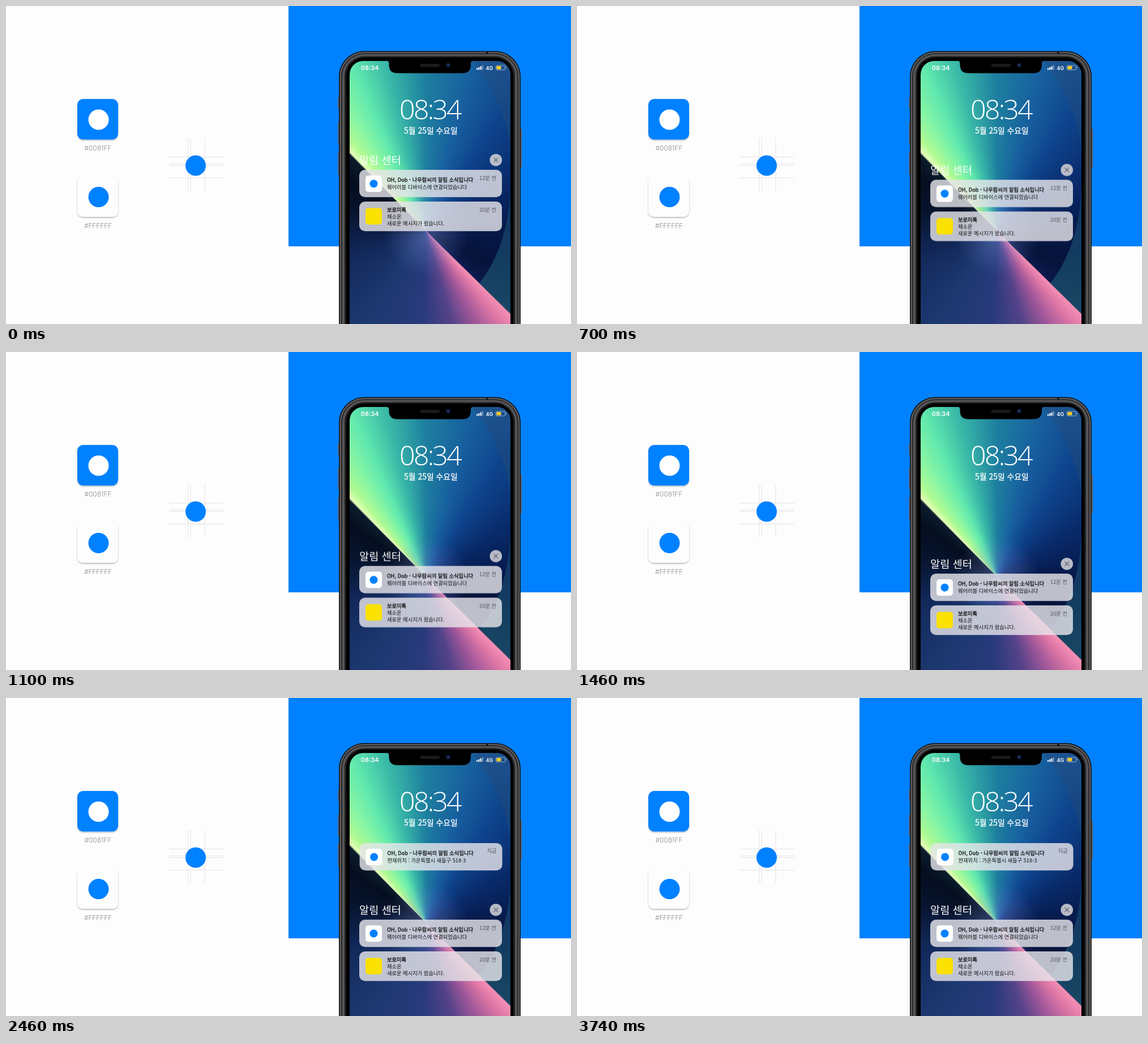
Recreate the animation shown at these times as an HTML page. Size 998 by 561 pixels, loop 3.76 s.

```html
<!DOCTYPE html>
<html lang="ko">
<head>
<meta charset="utf-8">
<title>Notification center</title>
<style>
  html, body { margin: 0; width: 100%; height: 100%; overflow: hidden; background: #fdfdfd; }
  .stage { position: relative; width: 998px; height: 561px; overflow: hidden; }
  svg { position: absolute; left: 0; top: 0; }
  text { font-family: "Noto Sans CJK KR", "Noto Sans CJK", "Noto Sans", sans-serif; }

  .wall {
    position: absolute; left: 606.5px; top: 97px; width: 284.5px; height: 470px;
    border-radius: 24px 24px 0 0;
    background:
      radial-gradient(circle at 135px 303px, rgba(110, 130, 200, .5), rgba(110, 130, 200, 0) 75px),
      conic-gradient(from 0deg at 135px 300px,
        #1d7e9f 0deg, #175f9f 16deg, #0e438c 33deg, #092a6a 58deg, #06194a 88deg,
        #06133a 118deg, #0b1a4c 134deg, #f58fb4 134.7deg, #dd76a5 141deg,
        #a2589a 151deg, #554389 164deg, #283a7c 182deg, #1c3870 215deg,
        #12285a 252deg, #07142e 285deg, #050e20 305deg, #0b1c2c 315deg,
        #e6ffba 316deg, #b2fa92 320deg, #86f5a4 328deg, #60e8ae 336deg,
        #3abaa8 346deg, #1d7e9f 360deg);
  }

  .label { font: 300 11.8px Inter, sans-serif; fill: #8b8b90; text-anchor: middle; }
  .guide { stroke: #e2e2e6; stroke-width: 1; }
  .status { font-family: Inter, sans-serif; font-weight: 600; fill: #fff; }
  .clock { font: 300 48.3px "Open Sans", sans-serif; letter-spacing: -2.8px; fill: #fff; text-anchor: middle; }
  .date { font-size: 13.9px; fill: #fff; stroke: #fff; stroke-width: .3; text-anchor: middle; }
  .head { font-size: 18.7px; fill: #fff; }
  .card { fill: #e6e5ea; fill-opacity: .82; }
  .title, .sub { font-size: 9.25px; fill: #111; }
  .title { stroke: #111; stroke-width: .28; }
  .ago { font-size: 9.3px; fill: #55555b; text-anchor: end; }

  .list { animation: drop 3760ms infinite; }
  .fresh { animation: slide 3760ms infinite; }
  @keyframes drop {
    0% { transform: translateY(-102px); }
    13.16% { transform: translateY(-102px); animation-timing-function: cubic-bezier(.33, 0, .67, 1); }
    34.04%, 100% { transform: none; }
  }
  @keyframes slide {
    0% { transform: translateX(-290px); }
    37.1% { transform: translateX(-290px); animation-timing-function: cubic-bezier(.33, 0, .67, 1); }
    58.3%, 100% { transform: none; }
  }
</style>
</head>
<body>
<div class="stage">
  <svg width="998" height="561" viewBox="0 0 998 561">
    <defs>
      <filter id="shadow" x="-20%" y="-20%" width="140%" height="140%">
        <feDropShadow dx="0" dy="1.5" stdDeviation="1.2" flood-color="#000" flood-opacity=".3"/>
      </filter>
    </defs>
    <rect width="998" height="561" fill="#fdfdfd"/>
    <rect x="499" width="499" height="424" fill="#0081ff"/>

    <!-- brand tiles -->
    <rect x="126" y="164" width="72" height="71.5" rx="10" fill="#0081ff" filter="url(#shadow)"/>
    <circle cx="163.5" cy="200.5" r="18" fill="#fff"/>
    <text class="label" x="162.5" y="255">#0081FF</text>
    <rect x="126" y="300" width="72" height="72" rx="10" fill="#fdfdfd" filter="url(#shadow)"/>
    <circle cx="163.5" cy="337" r="18" fill="#0081ff"/>
    <text class="label" x="162.5" y="391.5">#FFFFFF</text>

    <!-- construction lines -->
    <path class="guide" d="M321.5 233V327M326 233V327M351 233V327M288 266.5H384M288 278.5H384M288 281.5H384M288 303.5H384"/>
    <circle cx="335" cy="281.5" r="18" fill="#0081ff"/>

    <!-- phone body -->
    <g fill="#5c5d62">
      <rect x="586.5" y="161" width="4" height="21" rx="1.5"/>
      <rect x="586.5" y="205" width="4" height="38" rx="1.5"/>
      <rect x="586.5" y="256" width="4" height="42" rx="1.5"/>
      <rect x="906.5" y="216" width="4.5" height="69" rx="1.5"/>
    </g>
    <rect x="588" y="79.5" width="321" height="560" rx="45" fill="#151516"/>
    <rect x="589.7" y="81.2" width="317.6" height="560" rx="43.3" fill="#6a696b"/>
    <rect x="591.6" y="83" width="313.8" height="560" rx="41.4" fill="#2b2a2c"/>
    <rect x="594" y="85" width="309" height="560" rx="39" fill="#555456"/>
    <rect x="598" y="88.5" width="301" height="560" rx="35" fill="#1e1e1f"/>
    <rect x="601" y="91" width="295" height="560" rx="32" fill="#000"/>
    <rect x="848" y="80" width="4" height="5" fill="#1c1c1d"/>
  </svg>

  <div class="wall"></div>

  <svg width="998" height="561" viewBox="0 0 998 561">
    <defs>
      <clipPath id="screen"><rect x="606.5" y="97" width="284.5" height="500" rx="24"/></clipPath>
      <linearGradient id="rim" x1="0" y1="0" x2="0" y2="1">
        <stop offset="0" stop-color="#20528c"/>
        <stop offset=".5" stop-color="#123a6c"/>
        <stop offset="1" stop-color="#1d566c"/>
      </linearGradient>
      <g id="appIcon">
        <rect x="11" y="10" width="29" height="29" rx="5" fill="#fff"/>
        <circle cx="25.5" cy="24.5" r="7" fill="#0081ff"/>
      </g>
    </defs>

    <g clip-path="url(#screen)">
      <path d="M824 97Q905 200 891 320Q887 425 836 489L891 543V97Z" fill="url(#rim)" fill-opacity=".75"/>

      <text class="clock" x="749" y="200">08:34</text>
      <text class="date" x="750.5" y="224.5">5월 25일 수요일</text>

      <g class="list">
        <text class="head" x="624" y="380.5">알림 센터</text>
        <circle cx="865.3" cy="373.7" r="10.8" fill="#d0d0d6" fill-opacity=".88"/>
        <path d="M861.8 370.2l7 7m0-7l-7 7" stroke="#55555b" stroke-width="1.1" stroke-linecap="round"/>

        <g transform="translate(624 391)">
          <rect class="card" width="252" height="48.3" rx="10"/>
          <use href="#appIcon"/>
          <text class="title" x="49" y="20.6">OH, Dob - 나우람씨의 알림 소식입니다</text>
          <text class="sub" x="49" y="34.3">웨어러블 디바이스에 연결되었습니다</text>
          <text class="ago" x="242" y="17.6">12분 전</text>
        </g>

        <g transform="translate(624 447)">
          <rect class="card" width="252" height="52.3" rx="10"/>
          <rect x="11" y="11.5" width="29" height="29" rx="5" fill="#fae100"/>
          <text class="title" x="49" y="17.7">보로미톡</text>
          <text class="sub" x="49" y="30">채소온</text>
          <text class="sub" x="49" y="42.3">새로운 메시지가 왔습니다.</text>
          <text class="ago" x="242" y="17.8">20분 전</text>
        </g>
      </g>

      <g class="fresh">
        <g transform="translate(624.6 256)">
          <rect class="card" width="252" height="48.3" rx="10"/>
          <use href="#appIcon"/>
          <text class="title" x="49" y="20.6">OH, Dob - 나우람씨의 알림 소식입니다</text>
          <text class="sub" x="49" y="34.3">현재위치 : 가온특별시 새들구 518-3</text>
          <text class="ago" x="242" y="16.8">지금</text>
        </g>
      </g>
    </g>

    <!-- notch and status bar -->
    <path d="M672 96.5Q676.5 97 676.5 101.5V104Q676.5 118.5 691 118.5H806.5Q821 118.5 821 104V101.5Q821 97 825.5 96.5Z" fill="#000"/>
    <rect x="731.5" y="102" width="34.5" height="5.5" rx="2.7" fill="#1b1b1d"/>
    <circle cx="781" cy="104.3" r="4.2" fill="#0d1530"/>
    <circle cx="781" cy="104.3" r="1.7" fill="#24498c"/>

    <text class="status" x="626.8" y="112.8" font-size="10.8">08:34</text>
    <g fill="#fff">
      <rect x="831" y="109.5" width="2.2" height="3" rx=".6"/>
      <rect x="834.3" y="108" width="2.2" height="4.5" rx=".6"/>
      <rect x="837.6" y="106.3" width="2.2" height="6.2" rx=".6"/>
      <rect x="840.9" y="104.5" width="2.2" height="8" rx=".6" fill-opacity=".4"/>
    </g>
    <text class="status" x="847.5" y="112.6" font-size="9">4G</text>
    <rect x="865.3" y="104.8" width="16.4" height="8" rx="2.2" fill="none" stroke="#fff" stroke-opacity=".6" stroke-width=".9"/>
    <rect x="866.5" y="106" width="8" height="5.6" rx="1.1" fill="#fdd023"/>
    <path d="M882.8 107.3q1.2 .4 1.2 1.5t-1.2 1.5z" fill="#fff" fill-opacity=".6"/>
  </svg>
</div>
</body>
</html>
```
